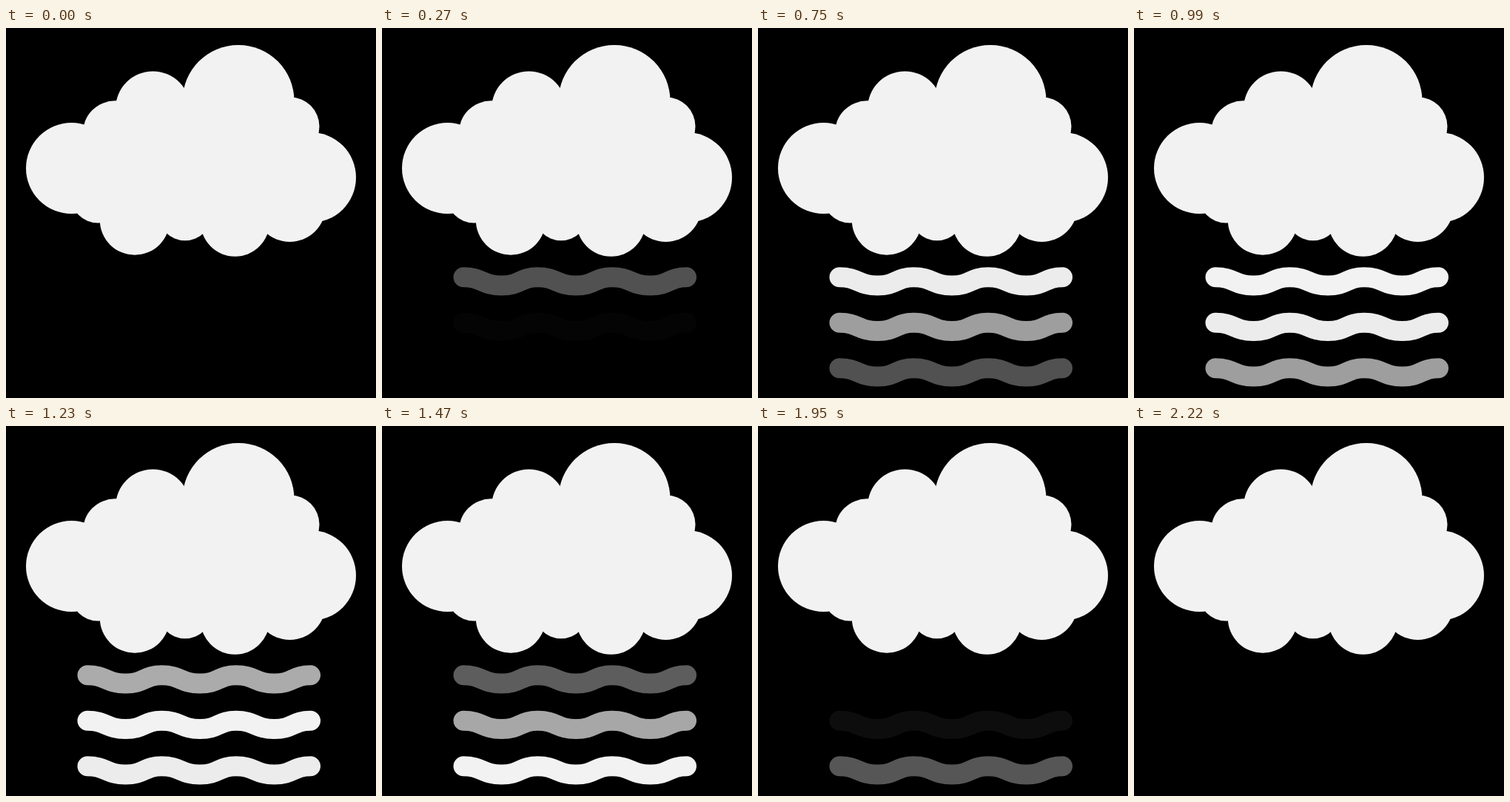
These frames come from a looping animation (500x500 px, 2280 ms). An HTML page:

```html
<!DOCTYPE html>
<html lang="en">
<head>
<meta charset="utf-8">
<title>Fog cloud</title>
<style>
  html, body { margin: 0; height: 100%; overflow: hidden; background: #000; }
  svg { display: block; width: 100%; height: 100%; }
</style>
</head>
<body>
<svg viewBox="0 0 500 500">
  <g fill="#f2f2f2">
    <circle cx="88.5" cy="189.5" r="61.5"/>
    <circle cx="147.5" cy="142" r="43.7"/>
    <circle cx="198.5" cy="109" r="50.5"/>
    <circle cx="314" cy="98.5" r="75.5"/>
    <circle cx="384" cy="133" r="39.5"/>
    <circle cx="412" cy="202" r="61"/>
    <circle cx="383.5" cy="240.5" r="48.5"/>
    <circle cx="309.5" cy="262" r="46.7"/>
    <circle cx="242" cy="250.5" r="36.7"/>
    <circle cx="174" cy="259.5" r="47.2"/>
    <circle cx="124.5" cy="226" r="37.5"/>
    <path d="M88 190L147 130L198 90H384L412 202L384 250L309 262H174L124 230Z"/>
  </g>
  <g id="waves" fill="none" stroke="#f2f2f2" stroke-width="27" stroke-linecap="round"></g>
</svg>
<script>
const LOOP = 2280, FADE = 750;
const group = document.getElementById('waves');
const period = 'c25 0 26 11.3 51.5 11.3s25 -11.3 49 -11.3';

const waves = [0, 1, 2].map(i => {
  const path = document.createElementNS('http://www.w3.org/2000/svg', 'path');
  path.setAttribute('d', `M110 ${336.7 + i * 61.5}` + period.repeat(3));
  return group.appendChild(path);
});

// Each wave fades in, holds, then fades out, one after another.
function draw(now) {
  const t = now % LOOP;
  waves.forEach((wave, i) => {
    const fadeIn = (t - 20 - i * 240) / FADE;
    const fadeOut = (1760 + i * 230 - t) / FADE;
    wave.style.opacity = Math.max(0, Math.min(1, fadeIn, fadeOut));
  });
}

const start = performance.now();
function tick() {
  draw(performance.now() - start);
  requestAnimationFrame(tick);
}
tick();
</script>
</body>
</html>
```
